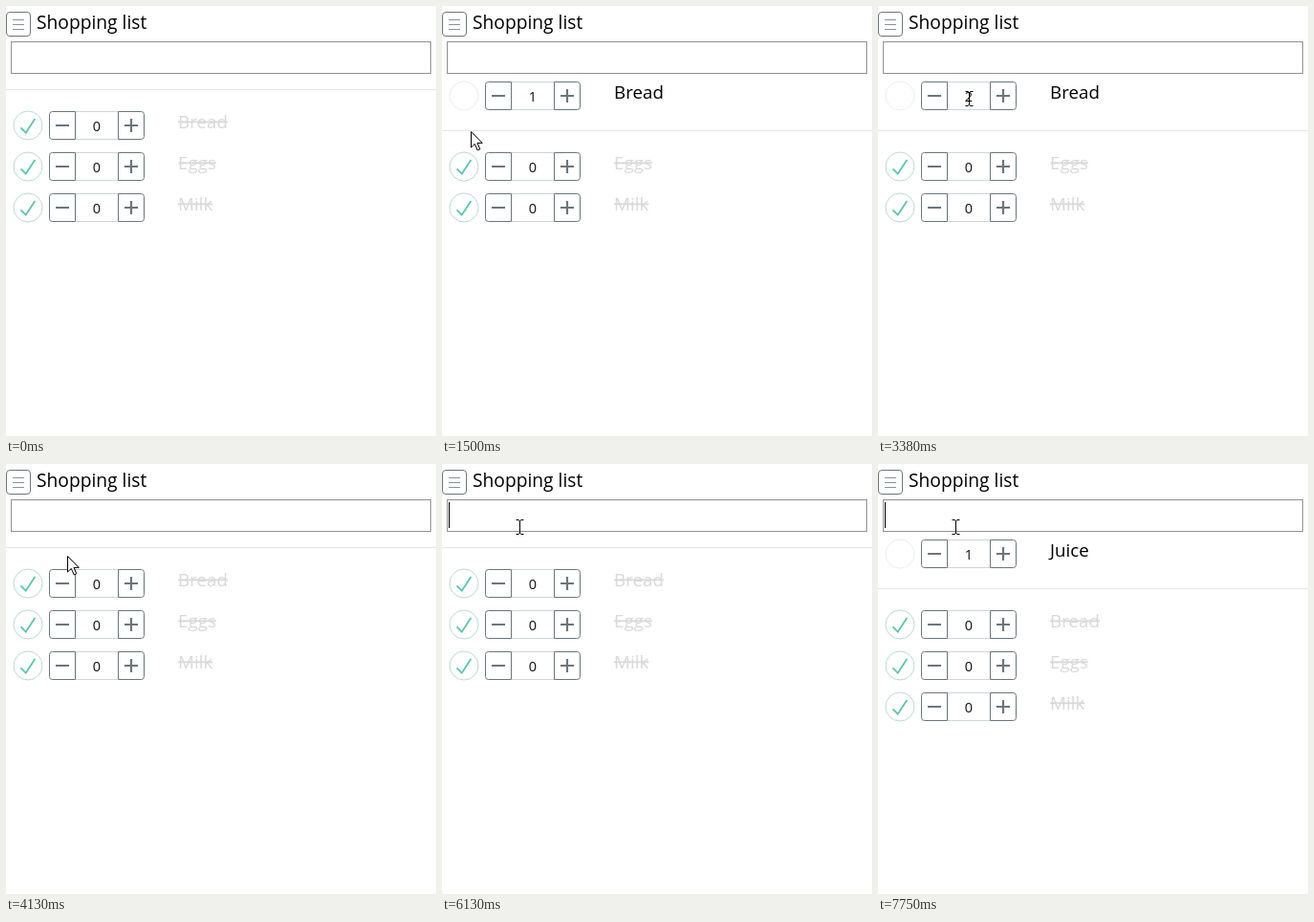
Write an HTML page that moves like this. It is 450x450 px and loops after 8000 ms.

```html
<!DOCTYPE html>
<html lang="en">
<head>
<meta charset="utf-8">
<title>Shopping list</title>
<style>
  html, body { margin: 0; width: 100%; height: 100%; overflow: hidden; background: #fff; }
  svg { display: block; width: 100%; height: 100%; font-family: "Open Sans", "Noto Sans", sans-serif; }
  text { font-size: 19.2px; fill: #000; white-space: pre; }
  .name { font-size: 18.8px; }
  .done .name { fill: #d9d9d9; text-decoration: line-through; }
  .count { font-size: 14.5px; fill: #111; text-anchor: middle; }
  .box { fill: #fff; stroke: #6c757d; }
  .field { fill: none; stroke: #ced4da; }
  .sign { fill: none; stroke: #6c757d; stroke-width: 2.2; }
  .ring { fill: none; stroke: #ededed; }
  .done .ring { stroke: #bddad5; }
  .tick { fill: #5dc2af; display: none; }
  .done .tick { display: inline; }
</style>
</head>
<body>
<svg viewBox="0 0 450 450">
  <rect class="box" x=".5" y="6.5" width="25" height="25" rx="3.5"/>
  <path d="M7 14.5H19M7 19.5H19M7 24.5H19" stroke="#8a9197"/>
  <text x="32" y="24">Shopping list</text>
  <rect x="5.5" y="37.5" width="439" height="33" fill="#fff" stroke="#929292"/>
  <text id="entry" x="6.5" y="62"></text>
  <path id="caret" d="M.5 40V67" stroke="#000"/>
  <path id="divider" d="M0 .5H450" stroke="#e5e5e5"/>
  <g id="rows"></g>
  <g id="cursor">
    <path id="arrow" d="M.5 .5V17L4.3 13.4 7.2 20 9.8 18.8 7 12.4H12.2Z" fill="#fff" stroke="#000"/>
    <path id="beam" d="M-3.5 -7.5H-1L.5 -6.5 2 -7.5H4.5M.5 -6.5V6.5M-3.5 7.5H-1L.5 6.5 2 7.5H4.5" fill="none" stroke="#000"/>
  </g>
</svg>
<script>
const LOOP = 8000, STEP = 125, ROW = 43, TOP = 94;
const $ = id => document.getElementById(id);
const at = (el, x, y) => el.setAttribute("transform", `translate(${x} ${y})`);
const show = (el, on) => el.setAttribute("visibility", on ? "visible" : "hidden");

// Pointer stops: time, x, y
const PATH = [
  [500, 1, 150], [875, 30, 131], [1875, 30, 131], [2250, 105, 106], [2500, 131, 97],
  [3000, 131, 97], [3375, 95, 97], [3500, 64, 96], [5125, 64, 96], [5750, 81, 64], [5875, 81, 66]
];

function makeRow(name) {
  const g = document.createElementNS("http://www.w3.org/2000/svg", "g");
  g.innerHTML = `
    <circle class="ring" cx="23" cy="0" r="15"/>
    <path class="tick" transform="translate(8 -15) scale(.3)" d="M72 25L42 71 27 56l-4 4 20 20 34-52z"/>
    <path class="field" d="M73 -14.5H117M73 14.5H117"/>
    <path class="box" d="M72.5 -14.5H48.5a3 3 0 0 0 -3 3V11.5a3 3 0 0 0 3 3H72.5Z"/>
    <path class="box" d="M117.5 -14.5H141.5a3 3 0 0 1 3 3V11.5a3 3 0 0 1 -3 3H117.5Z"/>
    <path class="sign" d="M52 0H66M124 0H138M131 -7V7"/>
    <text class="count" x="95" y="5.5"></text>
    <text class="name" x="180" y="3">${name}</text>`;
  $("rows").append(g);
  return { name, g, count: g.querySelector(".count") };
}
const rows = ["Juice", "Bread", "Eggs", "Milk"].map(makeRow);

function pointer(t) {
  let i = PATH.findIndex(p => p[0] > t);
  if (i < 0) return PATH[PATH.length - 1].slice(1);
  if (!i) return null;
  const [t0, x0, y0] = PATH[i - 1], [t1, x1, y1] = PATH[i];
  const k = (t - t0) / (t1 - t0);
  return [x0 + (x1 - x0) * k, y0 + (y1 - y0) * k].map(Math.round);
}

function amount(name, t) {
  if (name === "Juice") return t >= 7625 ? 1 : 0;
  if (name !== "Bread" || t < 1375 || t >= 3750) return 0;
  return t >= 2625 && t < 3625 ? 2 : 1;
}

function render(time) {
  const t = Math.floor(time / STEP) * STEP;
  const added = t >= 7625;
  let open = 0, done = 0;
  const shown = rows.filter(r => r.name !== "Juice" || added);
  const active = shown.filter(r => amount(r.name, t)).length;
  const line = 87 + ROW * active;
  show(rows[0].g, added);
  for (const r of shown) {
    const n = amount(r.name, t);
    r.count.textContent = n;
    r.g.setAttribute("class", n ? "" : "done");
    at(r.g, 0, n ? TOP + ROW * open++ : line + 38 + ROW * done++);
  }
  at($("divider"), 0, line);

  const typed = t < 6750 || added ? 0 : (t - 6750) / STEP + 1;
  const entry = $("entry");
  entry.textContent = "Juice".slice(0, typed);
  at($("caret"), 7 + (typed ? Math.round(entry.getComputedTextLength()) : 0), 0);
  show($("caret"), t >= 5875 && (t < 6375 || t >= 6750));

  const p = pointer(t);
  show($("cursor"), p);
  if (p) {
    const [x, y] = p;
    const overInput = x > 5 && x < 445 && y > 37 && y < 71;
    const overCount = x > 72 && x < 118 && active && Math.abs(y - TOP) < 15;
    const text = overInput || overCount;
    at($("cursor"), x, y);
    $("arrow").style.display = text ? "none" : "";
    $("beam").style.display = text ? "" : "none";
  }
}

const start = performance.now();
function tick() {
  render((performance.now() - start) % LOOP);
  requestAnimationFrame(tick);
}
tick();
</script>
</body>
</html>
```
